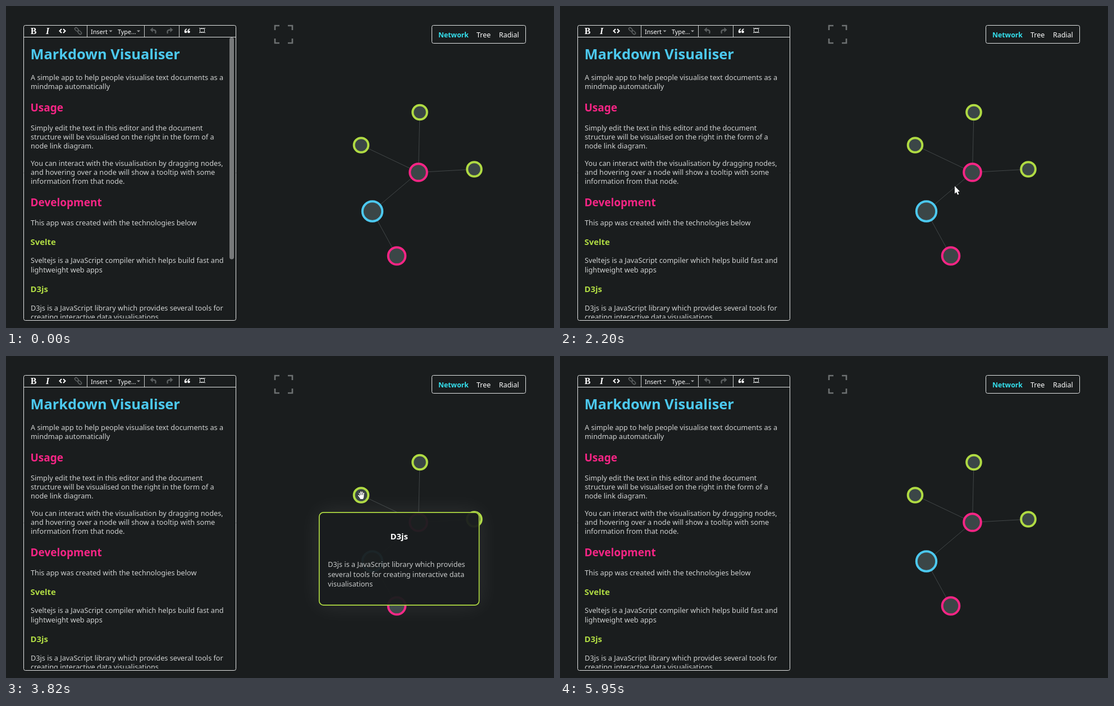
Write an HTML page with a canvas that moves like this. It is 976 px wide and 574 px high and loops after 6.65 s.

```html
<!DOCTYPE html>
<html lang="en">
<head>
<meta charset="utf-8">
<title>Markdown Visualiser</title>
<style>
html, body { margin: 0; width: 100%; height: 100%; overflow: hidden; background: #1a1d1e; }
canvas { display: block; }
</style>
</head>
<body>
<canvas id="stage" width="976" height="574"></canvas>
<script>
const ctx = document.getElementById('stage').getContext('2d');
const LOOP = 6650, START = 590, STEP = 101, SLACK = 9;
const BG = '#1a1d1e', BLUE = '#4cc9f0', PINK = '#f72585', GREEN = '#b0db43';
const WHITE = '#fff', BODY = '#d0d2d2', DIM = '#5b5f60';
const SANS = '"Noto Sans", "Open Sans", sans-serif';
const SERIF = '"Liberation Serif", "Noto Serif", serif';
const CARD_WIDTH = 286.5;

const root = { x: 652.5, y: 366, r: 17.7, color: BLUE };
const dev = { x: 734.5, y: 296.5, r: 15.3, color: PINK };
const usage = { x: 696, y: 445.5, r: 15.3, color: PINK };
const d3 = { x: 632.5, y: 248, r: 12.8, color: GREEN };
const svelte = { x: 737, y: 189.5, r: 12.8, color: GREEN };
const third = { x: 834, y: 291, r: 12.8, color: GREEN };
const nodes = [root, dev, usage, d3, svelte, third];
const links = [[root, dev], [root, usage], [dev, d3], [dev, svelte], [dev, third]];

// Steps count from START; the card sits where the pointer entered the node.
const cards = [
  { on: 7, off: 14, x: 577, y: 395.7, color: BLUE, title: 'Markdown Visualiser',
    lines: ['A simple app to help people visualise', 'text documents as a mindmap automatically'] },
  { on: 18, off: 23, x: 659.5, y: 325.7, color: PINK, title: 'Development',
    lines: ['This app was created with the', 'technologies below'] },
  { on: 28, off: 36, x: 557, y: 278, color: GREEN, title: 'D3js',
    lines: ['D3js is a JavaScript library which provides', 'several tools for creating interactive data', 'visualisations'] },
  { on: 39, off: 48, x: 661.5, y: 218.7, color: GREEN, title: 'Svelte',
    lines: ['Sveltejs is a JavaScript compiler which', 'helps build fast and lightweight web apps'] }
];

// Pointer path: step, x, y
const path = [
  [0, 925, 562], [2, 826, 523], [4, 672, 466], [5, 630, 441], [6, 641, 398],
  [7, 653, 370], [13, 656, 371], [14, 666, 356], [16, 703, 321], [18, 736, 297],
  [22, 733, 298], [23, 716, 291], [25, 668, 273], [27, 634, 257], [28, 633, 248],
  [35, 633, 248], [36, 650, 238], [37, 682, 216], [39, 738, 189], [46, 745, 193],
  [47, 749, 197], [48, 772, 252], [49, 809, 328], [50, 838, 408], [51, 863, 490], [52, 884, 563]
];

function text(str, x, y, size, color, weight = 400, align = 'left', family = SANS) {
  ctx.font = `${weight} ${size}px ${family}`;
  ctx.textAlign = align;
  ctx.fillStyle = color;
  ctx.fillText(str, x, y);
}

function line(points, color, width = 1) {
  ctx.beginPath();
  points.forEach(([x, y]) => ctx.lineTo(x, y));
  ctx.strokeStyle = color;
  ctx.lineWidth = width;
  ctx.stroke();
}

function polygon(points, color) {
  ctx.beginPath();
  points.forEach(([x, y]) => ctx.lineTo(x, y));
  ctx.closePath();
  ctx.fillStyle = color;
  ctx.fill();
}

function roundRect(x, y, w, h, r) {
  ctx.beginPath();
  ctx.roundRect(x, y, w, h, r);
}

function frame(x, y, w, h, r, color, width) {
  roundRect(x, y, w, h, r);
  ctx.strokeStyle = color;
  ctx.lineWidth = width;
  ctx.stroke();
}

function turnArrow(x, dir) {
  ctx.save();
  ctx.translate(x, 44);
  ctx.scale(dir, 1);
  polygon([[-6, -1.5], [-1, -6], [-1, 3]], DIM);
  ctx.beginPath();
  ctx.moveTo(-2, -1.5);
  ctx.quadraticCurveTo(6, -2, 3.5, 5);
  ctx.strokeStyle = DIM;
  ctx.lineWidth = 2.4;
  ctx.stroke();
  ctx.restore();
}

function quoteMark(x) {
  ctx.beginPath();
  ctx.arc(x, 46, 2.3, 0, 7);
  ctx.fillStyle = WHITE;
  ctx.fill();
  ctx.beginPath();
  ctx.moveTo(x - 1.5, 46);
  ctx.quadraticCurveTo(x - 1.6, 42, x + 2, 41);
  ctx.strokeStyle = WHITE;
  ctx.lineWidth = 1.5;
  ctx.stroke();
}

function toolbar() {
  text('B', 49, 50, 16, WHITE, 'bold', 'center', SERIF);
  text('I', 74, 50, 16, WHITE, 'italic bold', 'center', SERIF);
  line([[99, 41], [95.5, 44.5], [99, 48]], WHITE, 2);
  line([[102, 41], [105.5, 44.5], [102, 48]], WHITE, 2);
  for (const d of [-2.8, 2.8]) {
    ctx.save();
    ctx.translate(128.5 + d, 44.5 + d);
    ctx.rotate(Math.PI / 4);
    frame(-3.6, -2.2, 7.2, 4.4, 2.2, DIM, 1.5);
    ctx.restore();
  }
  for (const x of [144.5, 246.5, 308.5]) line([[x, 35], [x, 55]], '#c8caca');
  text('Insert', 151, 49.5, 10.8, WHITE);
  text('Type...', 199, 49.5, 10.8, WHITE);
  for (const x of [186.5, 236]) polygon([[x - 3, 43.5], [x + 3, 43.5], [x, 46.5]], '#a5a7a8');
  turnArrow(262.5, 1);
  turnArrow(291.5, -1);
  quoteMark(320);
  quoteMark(325.5);
  frame(345.5, 40.5, 8, 6, 0, '#d5d7d7', 1);
  for (const y of [39.5, 47.5]) {
    for (let x = 344; x < 355; x += 3) {
      ctx.fillStyle = '#d5d7d7';
      ctx.fillRect(x, y - 0.5, 2, 1);
    }
  }
}

function editor(showBar) {
  toolbar();
  ctx.save();
  ctx.beginPath();
  ctx.rect(32, 56, 377, 501);
  ctx.clip();
  const paragraph = (y, ...rows) => rows.forEach((row, i) => text(row, 44, y + i * 16.2, 12.7, BODY));
  const heading = (str, y, size, color) => text(str, 43.5, y, size, color, 700);
  heading('Markdown Visualiser', 94.6, 25.4, BLUE);
  paragraph(131.5, 'A simple app to help people visualise text documents as a', 'mindmap automatically');
  heading('Usage', 188, 19, PINK);
  paragraph(221.5, 'Simply edit the text in this editor and the document',
    'structure will be visualised on the right in the form of a', 'node link diagram.');
  paragraph(284.5, 'You can interact with the visualisation by dragging nodes,',
    'and hovering over a node will show a tooltip with some', 'information from that node.');
  heading('Development', 357, 19, PINK);
  paragraph(390.5, 'This app was created with the technologies below');
  heading('Svelte', 426, 14.9, GREEN);
  paragraph(458.3, 'Sveltejs is a JavaScript compiler which helps build fast and', 'lightweight web apps');
  heading('D3js', 510, 14.9, GREEN);
  paragraph(542.5, 'D3js is a JavaScript library which provides several tools for',
    'creating interactive data visualisations');
  ctx.restore();
  if (showBar) {
    roundRect(398, 56, 8, 395.5, 4);
    ctx.fillStyle = '#77797a';
    ctx.fill();
  }
  line([[32, 55.5], [409, 55.5]], '#e4e6e6');
  frame(31.5, 34.5, 378, 526, 3, '#e4e6e6', 1);
}

function controls() {
  for (const sx of [-1, 1]) {
    for (const sy of [-1, 1]) {
      const x = 494.5 + sx * 15.5, y = 50.5 + sy * 15.5;
      line([[x - sx * 8, y], [x, y], [x, y - sy * 8]], '#6d7172', 2.6);
    }
  }
  frame(758.5, 34.5, 167, 32, 3, '#e4e6e6', 1);
  text('Network', 770, 56, 12.3, '#35e0ee', 600);
  text('Tree', 838, 56, 12.4, WHITE);
  text('Radial', 878, 56, 12.4, WHITE);
}

function graph() {
  for (const [a, b] of links) line([[a.x, a.y], [b.x, b.y]], '#424748');
  for (const { x, y, r, color } of nodes) {
    ctx.beginPath();
    ctx.arc(x, y, r, 0, 7);
    ctx.fillStyle = '#3b4647';
    ctx.fill();
    ctx.strokeStyle = color;
    ctx.lineWidth = 4;
    ctx.stroke();
  }
}

// Soft light around a box, leaving its inside untouched.
function glow(x, y, w, h, r) {
  ctx.save();
  ctx.beginPath();
  ctx.rect(0, 0, 976, 574);
  ctx.roundRect(x, y, w, h, r);
  ctx.clip('evenodd');
  ctx.shadowColor = 'rgba(255,255,255,.09)';
  ctx.shadowBlur = 40;
  roundRect(x, y, w, h, r);
  ctx.fillStyle = BG;
  ctx.fill();
  ctx.restore();
}

function tooltip(card, step) {
  if (step < card.on || step > card.off) return;
  const opening = step === card.on;
  const { x, y, lines } = card;
  const height = opening ? 92.5 : 114.4 + lines.length * 17.5;
  const border = 1.7;
  ctx.save();
  ctx.globalAlpha = opening ? 0.5 : step === card.off ? 0.4 : 1;
  glow(x, y, CARD_WIDTH, height, 8.5);
  roundRect(x, y, CARD_WIDTH, height, 8.5);
  ctx.fillStyle = 'rgba(26,29,30,.95)';
  ctx.fill();
  frame(x + border / 2, y + border / 2, CARD_WIDTH - border, height - border, 7.6, card.color, border);
  text(card.title, x + CARD_WIDTH / 2, y + 49.3, 14.9, WHITE, 700, 'center');
  if (!opening) lines.forEach((row, i) => text(row, x + 16.3, y + 98 + i * 17.5, 12.7, '#c8caca'));
  ctx.restore();
}

function pointerAt(step) {
  const i = path.findIndex(key => key[0] >= step);
  if (i < 0) return null;
  const b = path[i], a = path[Math.max(0, i - 1)];
  const f = a === b ? 1 : (step - a[0]) / (b[0] - a[0]);
  return [a[1] + (b[1] - a[1]) * f, a[2] + (b[2] - a[2]) * f];
}

function arrow() {
  const shape = [[0, 0], [0, 13.5], [3, 10.8], [5.2, 15.5], [7.4, 14.5], [5.3, 10], [9, 9.6]];
  polygon(shape, WHITE);
}

function hand() {
  const fingers = [[-3.6, -3.6, -2, 2], [-1.1, -5.8, -0.5, 2], [1.6, -5.6, 1.2, 2], [4.2, -3.6, 3, 2], [-5.3, 0.6, -2, 4.2]];
  ctx.lineCap = 'round';
  for (const [x1, y1, x2, y2] of fingers) {
    line([[x1, y1], [x2, y2]], '#15181a', 3.4);
    line([[x1, y1], [x2, y2]], WHITE, 2);
  }
  ctx.lineCap = 'butt';
  polygon([[-4, 1.5], [-2, 0], [4.4, 0], [4.2, 3.5], [3, 7], [-1.8, 7], [-3.6, 4]], WHITE);
}

function render(t) {
  const step = t < START ? -1 : Math.floor((t - START + SLACK) / STEP);
  ctx.fillStyle = BG;
  ctx.fillRect(0, 0, 976, 574);
  editor(step < 0);
  controls();
  graph();
  cards.forEach(card => tooltip(card, step));
  const pos = step < 0 ? null : pointerAt(step);
  if (!pos) return;
  ctx.save();
  ctx.translate(...pos);
  if (cards.some(card => step >= card.on && step < card.off)) hand();
  else arrow();
  ctx.restore();
}

const began = performance.now();
function tick() {
  render((performance.now() - began) % LOOP);
  requestAnimationFrame(tick);
}
tick();
</script>
</body>
</html>
```
